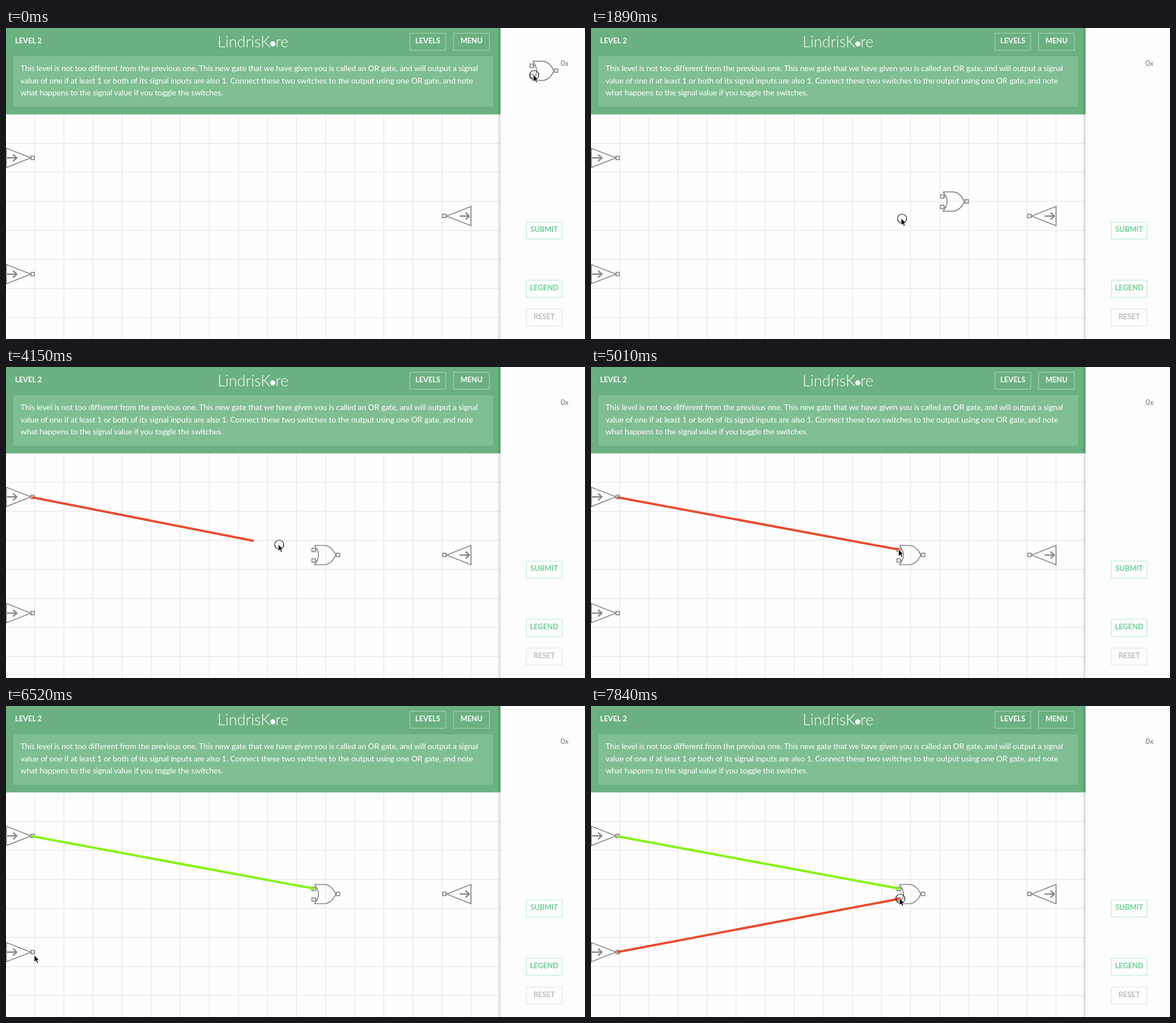
Animation of 1021x549 px, one loop 7940 ms. Source, as an HTML page:

```html
<!DOCTYPE html>
<html lang="en">
<head>
<meta charset="utf-8">
<title>Logic gate level</title>
<style>
  html, body { margin: 0; width: 100%; height: 100%; overflow: hidden; background: #fefefe; }
  svg { display: block; width: 1021px; height: 549px; font: 14.08px Lato, sans-serif; }
  .body { letter-spacing: -.15px; }
  .label { font-size: 12.8px; font-weight: 700; }
  .mid { text-anchor: middle; }
  .logo { font-size: 27px; font-weight: 300; }
  .part { fill: none; stroke: #888; stroke-width: 1.7; }
  .wire { stroke-width: 4; }
</style>
</head>
<body>
<svg viewBox="0 0 1021 549">
  <defs>
    <linearGradient id="shade">
      <stop offset="0" stop-opacity="0"/>
      <stop offset="1" stop-opacity=".16"/>
    </linearGradient>
    <path id="arrow" d="M0 0H17M10.5 -6L17 0L10.5 6" stroke-width="2.5"/>
    <g id="switch">
      <path d="M.5 -17V17L44 0Z"/>
      <rect x="44" y="-3" width="6" height="6"/>
      <use href="#arrow" x="2"/>
    </g>
  </defs>
  <path id="grid" stroke="#e1e1e1" fill="none"/>
  <rect width="872" height="152.5" fill="#6bb080"/>
  <rect x="13" y="50" width="846" height="89" fill="#80be94"/>
  <rect x="866" width="6" height="549" fill="url(#shade)"/>
  <rect x="872" width="149" height="549" fill="#fdfdfd"/>
  <g fill="#fff">
    <text class="label" x="16" y="26.5">LEVEL 2</text>
    <text class="logo" x="373" y="33.5">LindrisK</text>
    <circle cx="470.5" cy="28" r="4.5"/>
    <text class="logo" x="498" y="33.5" text-anchor="end">re</text>
    <g class="body">
      <text x="25.5" y="76">This level is not too different from the previous one. This new gate that we have given you is called an OR gate, and will output a signal</text>
      <text x="25.5" y="97.6">value of one if at least 1 or both of its signal inputs are also 1. Connect these two switches to the output using one OR gate, and note</text>
      <text x="25.5" y="119.2">what happens to the signal value if you toggle the switches.</text>
    </g>
  </g>
  <text x="978" y="67" fill="#777" style="font-size:12.8px">0x</text>
  <g id="buttons"></g>
  <g class="part">
    <use href="#switch" y="229.3"/>
    <use href="#switch" y="434.5"/>
    <path d="M820 315V349L777 332Z"/>
    <rect x="770" y="328.7" width="6" height="6"/>
    <use href="#arrow" x="800" y="332"/>
    <g id="gate">
      <path d="M544 315H563Q575 317 581.5 332Q575 347 563 349H544Q558 332 544 315M546 323H550M546 341.5H550"/>
      <rect x="539.5" y="320" width="6" height="6"/>
      <rect x="539.5" y="338.5" width="6" height="6"/>
      <rect x="582.5" y="328.7" width="6" height="6"/>
    </g>
  </g>
  <line id="wire1" class="wire" x1="46" y1="230"/>
  <line id="wire2" class="wire" x1="46" y1="434.5"/>
  <g id="cursor">
    <circle r="8" fill="none" stroke="#111" stroke-width="1.2"/>
    <path d="M-1.5 -.5V11.5L1.3 9L3.3 13.3L5.4 12.4L3.4 8.2H7Z" stroke="#fff" stroke-width=".8"/>
  </g>
</svg>
<script>
const LOOP = 7940, TICK = 115, CELL = 51.28;
const RED = '#e94c2f', GREEN = '#84f30a';
const $ = id => document.getElementById(id);

// where the pointer turns or rests
const source = { x: 931.5, y: 83 }, dropped = { x: 548.5, y: 336.5 };
const out1 = { x: 47, y: 229.5 }, in1 = { x: 544, y: 322.5 };
const toggle = { x: 25.5, y: 228.5 };
const out2 = { x: 48, y: 435.5 }, in2 = { x: 545.5, y: 340 };
const route = [
  [0, source], [460, source], [1035, { x: 777, y: 204 }], [1840, dropped],
  [2530, dropped], [2875, { x: 85.5, y: 184 }], [3220, out1],
  [3450, out1], [3795, { x: 288, y: 258 }], [4025, { x: 437, y: 307 }], [4300, in1],
  [5060, in1], [5290, { x: 71, y: 230 }], [5560, toggle],
  [5865, toggle], [5980, { x: 67, y: 408 }], [6250, { x: 62, y: 456 }], [6500, out2],
  [6980, out2], [7475, in2], [LOOP, in2]
];
const pressed = [[0, 2450], [3430, 4900], [5570, 5800], [6810, LOOP]];

function pointerAt(t) {
  t = Math.max(0, t);
  const next = route.findIndex(([time]) => time > t);
  const [t0, a] = route[next - 1], [t1, b] = route[next];
  const k = (t - t0) / (t1 - t0);
  return { x: a.x + (b.x - a.x) * k, y: a.y + (b.y - a.y) * k };
}

const snap = distance => Math.round(distance / CELL * 2) / 2 * CELL;
const move = (id, x, y) => $(id).setAttribute('transform', `translate(${x} ${y})`);
const show = (node, on) => node.setAttribute('visibility', on ? 'visible' : 'hidden');

function setWire(id, visible, end, color) {
  const wire = $(id);
  show(wire, visible);
  wire.setAttribute('x2', end.x);
  wire.setAttribute('y2', end.y);
  wire.setAttribute('stroke', color);
}

function button(label, x, y, border, color) {
  return `<rect x="${x}" y="${y}" width="63" height="30" fill="none" stroke="${border}" stroke-width="1.3"/>
    <text class="label mid" x="${x + 31.5}" y="${y + 17.5}" fill="${color}">${label}</text>`;
}

function buildStage() {
  let d = '';
  for (let i = 0; i < 16; i++) d += `M${50.8 + CELL * i} 152V549`;
  for (let i = 1; i < 8; i++) d += `M0 ${152.2 + CELL * i}H872`;
  $('grid').setAttribute('d', d);
  $('buttons').innerHTML =
    button('LEVELS', 712.3, 9.3, '#a0d0af', '#fff') +
    button('MENU', 789.3, 9.3, '#a0d0af', '#fff') +
    button('SUBMIT', 917.5, 342.7, '#c4eedb', '#6cd096') +
    button('LEGEND', 917.5, 445.3, '#c4eedb', '#6cd096') +
    button('RESET', 917.5, 496.3, '#e6e6e6', '#bdbdbd');
}

function draw(now) {
  const t = now % LOOP;
  const tick = Math.floor(t / TICK) * TICK;
  const pointer = pointerAt(tick);
  move('cursor', pointer.x, pointer.y);
  show($('cursor').firstElementChild, pressed.some(([from, to]) => t >= from && t < to));

  // the gate trails the pointer by two ticks and snaps to half cells
  const grip = pointerAt(Math.min(tick - 2 * TICK, 2500));
  move('gate', snap(grip.x - dropped.x), snap(grip.y - dropped.y));

  // a dragged wire trails by one tick
  setWire('wire1', t >= 3550, pointerAt(Math.min(tick - TICK, 4900)), t < 5690 ? RED : GREEN);
  setWire('wire2', t >= 7050, pointerAt(tick - TICK), RED);
  requestAnimationFrame(() => draw(performance.now() - start));
}

buildStage();
const start = performance.now();
draw(0);
</script>
</body>
</html>
```
